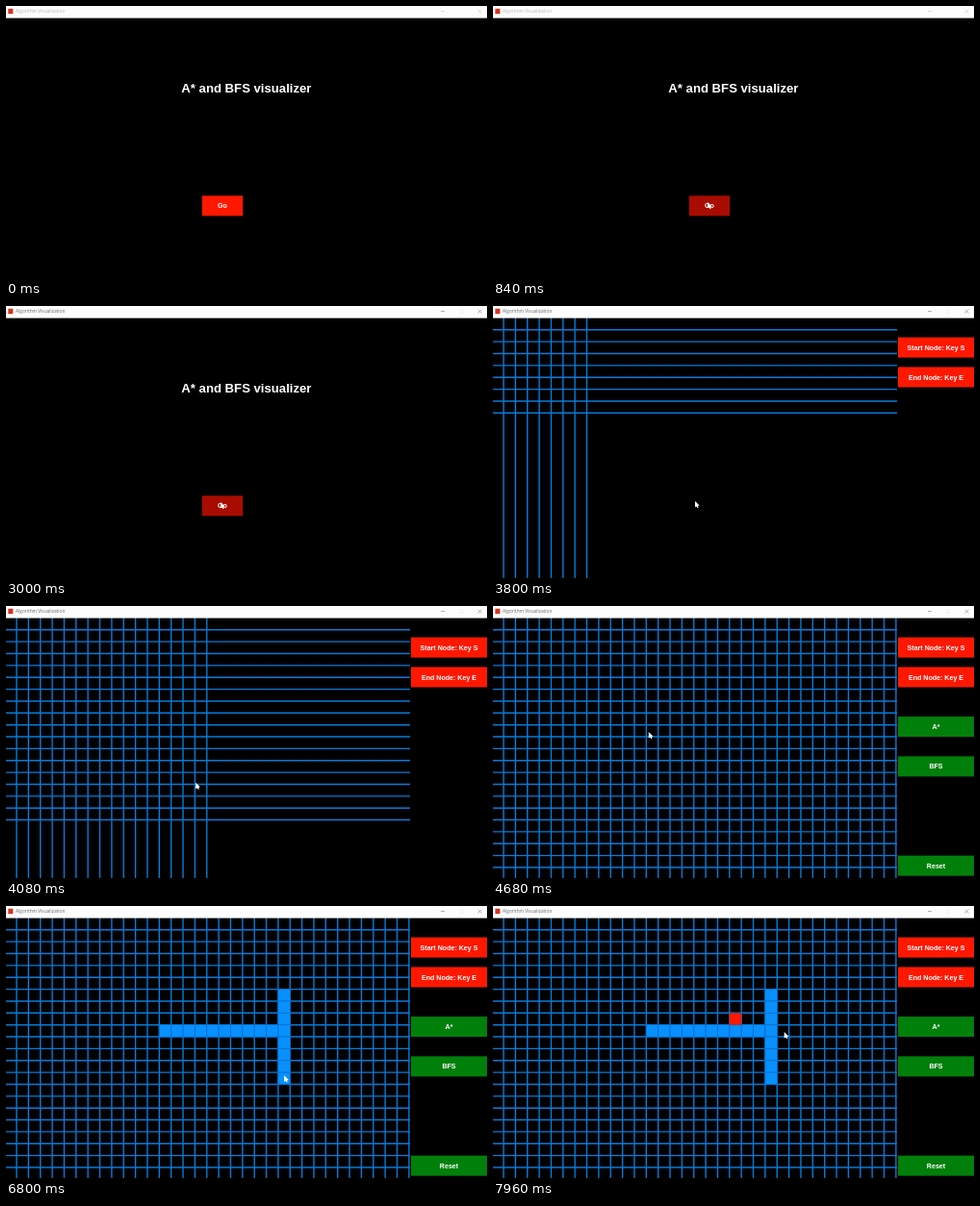
These frames come from a looping animation (500x283 px, 8 s). An HTML page with a canvas:

```html
<!DOCTYPE html>
<html lang="en">
<head>
<meta charset="utf-8">
<title>Algorithm Visualization</title>
<style>
  html, body { margin: 0; width: 100%; height: 100%; overflow: hidden; background: #000; }
  canvas { display: block; width: 100vw; height: 100vh; }
</style>
</head>
<body>
<canvas id="stage" width="500" height="283"></canvas>
<script>
const ctx = document.getElementById('stage').getContext('2d');
const LOOP = 8000, CELL = 12.36, LEFT = 11, TOP = 24.8, GRID_RIGHT = 420, LINES = 34;
const RED = '#ff1800', DARK_RED = '#a80c00', GREEN = '#00800a';
const LINE = '#087bd8', WALL = '#0890ff', WALL_EDGE = '#066fc8';
const BOLD = '"Liberation Sans", Arial, sans-serif';

// Milestones in ms
const APPEAR = 200, FOCUS = 960, BOARD = 3360, GRID_START = 3530, GRID_END = 4630;
const ROW_START = 4740, ROW_END = 5500, COLUMN_START = 6140, COLUMN_END = 6900, START_NODE = 7320;

const columnX = column => LEFT + column * CELL;
const rowY = row => TOP + row * CELL;
const at = (column, row) => ({ x: columnX(column), y: rowY(row) });
const clamp = (v, lo, hi) => Math.max(lo, Math.min(hi, v));
const ease = p => p * p * (3 - 2 * p);

const ENTRY = { x: 291, y: 142 }, GO = { x: 223, y: 204 }, ABOVE_GO = { x: 211.7, y: 178.7 };
const glide = (start, end, to) => ({ start, end, to });
const GLIDES = [
  glide(APPEAR, 800, GO),
  glide(1000, 1680, ABOVE_GO),
  glide(1760, 2500, GO),
  glide(BOARD, 3800, { x: 210, y: 203 }),
  glide(3800, GRID_END, at(12.2, 8.6)),
  glide(ROW_START, ROW_END, at(21.6, 8.6)),
  glide(ROW_END, 5840, at(22.5, 6.65)),
  glide(5840, 6060, at(22.5, 5.3)),
  glide(COLUMN_START, COLUMN_END, at(22.5, 12.6)),
  glide(COLUMN_END, 7160, at(19.4, 7.3)),
  glide(7600, 7960, at(23.6, 8.6))
];

function pointerAt(t) {
  return GLIDES.reduce((pos, { start, end, to }) => {
    const p = ease(clamp((t - start) / (end - start), 0, 1));
    return { x: pos.x + (to.x - pos.x) * p, y: pos.y + (to.y - pos.y) * p };
  }, ENTRY);
}

function rect(x, y, w, h, color) {
  ctx.fillStyle = color;
  ctx.fillRect(x, y, w, h);
}

function text(label, x, y, font, color = '#fff', align = 'center') {
  ctx.font = font;
  ctx.textAlign = align;
  ctx.fillStyle = color;
  ctx.fillText(label, x, y);
}

function button(label, x, y, w, color) {
  rect(x, y, w, 21, color);
  text(label, x + w / 2, y + 13, `bold 7.1px ${BOLD}`);
}

function line(x1, y1, x2, y2, color, width) {
  ctx.strokeStyle = color;
  ctx.lineWidth = width;
  ctx.beginPath();
  ctx.moveTo(x1, y1);
  ctx.lineTo(x2, y2);
  ctx.stroke();
}

function titleBar(active) {
  const ink = active ? '#666' : '#bbb';
  rect(0, 0, 500, 12.6, '#fdfdfd');
  rect(2.3, 2.8, 5, 5.4, '#d8301c');
  text('Algorithm Visualization', 10, 7.4, '4.8px "Open Sans", sans-serif', ink, 'left');
  line(452, 5.5, 456, 5.5, ink, 0.5);
  if (active) {
    ctx.strokeStyle = '#e6e6e6';
    ctx.strokeRect(471.5, 4, 3.5, 3.5);
  }
  line(490.5, 3.7, 494.5, 7.7, ink, 0.5);
  line(494.5, 3.7, 490.5, 7.7, ink, 0.5);
}

function menu({ x, y }, visible) {
  text('A* and BFS visualizer', 249.9, 90.2, `bold 13.15px ${BOLD}`);
  const hover = visible && x > 204 && x < 246 && y > 198 && y < 219;
  button('Go', 203.8, 197.4, 42.4, hover ? DARK_RED : RED);
}

function gridLines(t) {
  const progress = clamp((t - GRID_START) / (GRID_END - GRID_START), 0, 1);
  const count = Math.floor(progress * LINES);
  for (let i = 0; i < count; i++) {
    line(columnX(i), 12, columnX(i), 283, LINE, 1.4);
    line(0, rowY(i), GRID_RIGHT, rowY(i), LINE, 1.4);
  }
}

function cell(column, row, color, edge) {
  const { x, y } = at(column, row);
  rect(x, y, CELL, CELL, color);
  ctx.strokeStyle = edge;
  ctx.lineWidth = 0.8;
  ctx.strokeRect(x, y, CELL, CELL);
}

// Each drag fills every cell the pointer has crossed.
function walls(t) {
  if (t >= ROW_START) {
    const { x } = pointerAt(Math.min(t, ROW_END));
    for (let c = 12; columnX(c) <= x; c++) cell(c, 8, WALL, WALL_EDGE);
  }
  if (t >= COLUMN_START) {
    const { y } = pointerAt(Math.min(t, COLUMN_END));
    for (let r = 5; rowY(r) <= y; r++) cell(22, r, WALL, WALL_EDGE);
  }
  if (t >= START_NODE) cell(19, 7, RED, '#75405c');
}

function board(t) {
  const sideButton = (label, y, color) => button(label, 421, y, 79, color);
  gridLines(t);
  walls(t);
  sideButton('Start Node: Key S', 32.6, RED);
  sideButton('End Node: Key E', 63.5, RED);
  if (t >= GRID_END) {
    sideButton('A*', 115.1, GREEN);
    sideButton('BFS', 156.4, GREEN);
    sideButton('Reset', 259.7, GREEN);
  }
}

function pointer({ x, y }) {
  line(x + 1.6, y + 3.5, x + 3.1, y + 7, '#fff', 1.2);
  ctx.fillStyle = '#fff';
  ctx.beginPath();
  ctx.moveTo(x, y);
  ctx.lineTo(x, y + 6.3);
  ctx.lineTo(x + 4.5, y + 4.5);
  ctx.fill();
}

function draw(t) {
  const position = pointerAt(t), visible = t >= APPEAR;
  rect(0, 0, 500, 283, '#000');
  if (t < BOARD) menu(position, visible);
  else board(t);
  titleBar(t >= FOCUS);
  if (visible) pointer(position);
}

const start = performance.now();
function frame() {
  draw((performance.now() - start) % LOOP);
  requestAnimationFrame(frame);
}
frame();
</script>
</body>
</html>
```
